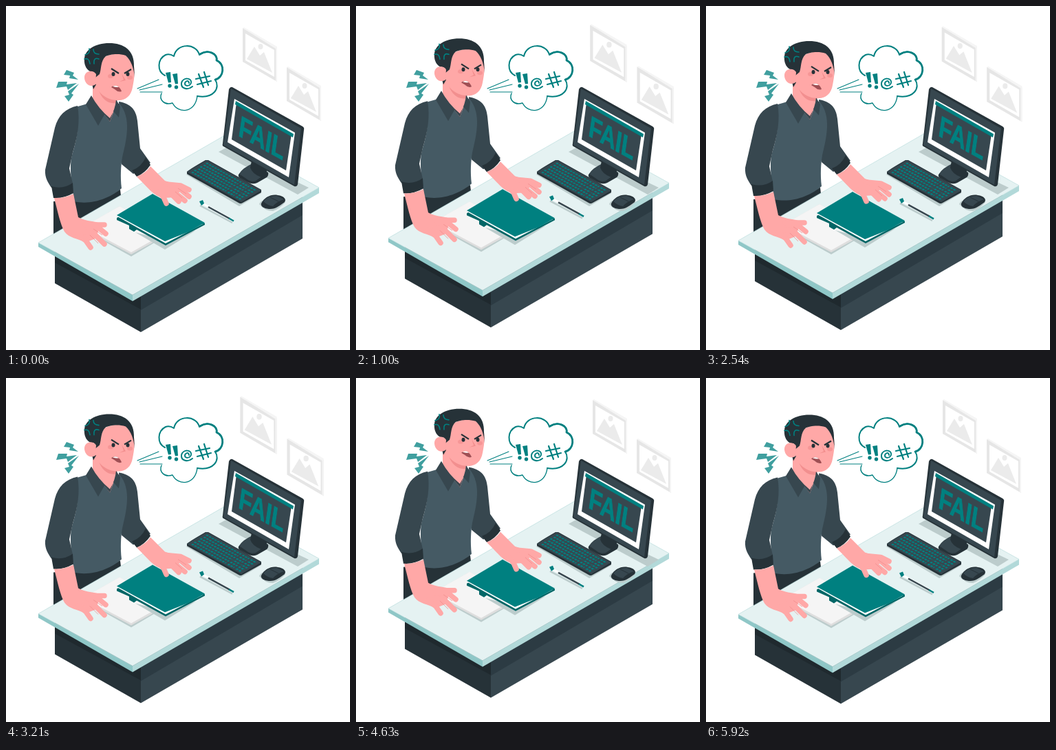
An HTML page that plays this animation: 500 by 500 pixels, repeating every 5.96 s.

```html
<!DOCTYPE html>
<html lang="en">
<head>
<meta charset="utf-8">
<title>Angry at the desk</title>
<style>
html, body { margin: 0; width: 100%; height: 100%; overflow: hidden; background: #fff; }
svg { display: block; width: 100vw; height: 100vh; }
.teal { fill: #008080; }
.ink { fill: #263238; }
.slate { fill: #37474f; }
.vest { fill: #455a64; }
.skin { fill: #ffa8a7; }
.blush { fill: #f28f8f; }
.finger { fill: none; stroke: #ffa8a7; stroke-width: 7.5; stroke-linecap: round; stroke-linejoin: round; }
.line { fill: none; stroke: #008080; stroke-linecap: round; stroke-linejoin: round; }
.shade { fill: #bccccc; }
text { font: bold 42px "Liberation Sans", Arial, sans-serif; }
</style>
</head>
<body>
<svg viewBox="0 0 500 500">
  <defs>
    <g id="picture">
      <path fill="#e6e6e6" d="M344 32l50 29v49l-50-29z"/>
      <path fill="#f5f5f5" d="M344 32l2-1 48 28v51l-2-1V62z"/>
      <path fill="#fff" d="M348 40l42 24v39l-42-24z"/>
      <path fill="#ebebeb" d="M350 77l11-18 8 13 6-5 12 30z"/>
      <ellipse fill="#ebebeb" cx="370" cy="59" rx="3.5" ry="4"/>
    </g>
  </defs>

  <g id="pictures">
    <use href="#picture"/>
    <use href="#picture" x="64" y="57"/>
  </g>

  <!-- speech cloud -->
  <path class="line" stroke-width="2" d="M231 101C219 95 220 77 232 71Q238 69 244 73C248 53 277 54 281 71C293 62 309 69 306 79C319 84 317 104 304 107C312 119 302 135 278 131"/>
  <path class="line" stroke-width="1.4" d="M226 127C222 136 230 145 242 141C250 157 275 156 278 131"/>
  <path class="line" stroke-width="2.800" d="M282 70C294 62 308 70 306 79C319 84 317 104 304 107"/>
  <path class="teal" d="M232 97l7-1 1 15-4 .5zM242 99l7-1 1 15-4 .5z"/>
  <circle class="teal" cx="238" cy="116" r="2.700"/>
  <circle class="teal" cx="247.500" cy="118" r="2.700"/>
  <path class="line" stroke-width="2" d="M266 112C266 107 260 109 260 113C260 117 267 117 269 112C271 104 257 103 255 112C254 120 264 123 271 117"/>
  <path class="line" stroke-width="2.200" d="M280 99l7 19M288 96l6 19M276 106l20-4M278 114l20-5"/>
  <path class="line" stroke-width="1.100" d="M191 120L222 107M194 122L227 114M195 125L227 125"/>

  <!-- anger bolts -->
  <path fill="#409f9f" d="M88 93l11 4-2 4 8 6-13-2 1-4-9-1zM76 110l13 0-1 4 15-2-13 10-2-5-15 2zM106 113l-11 14 3 2-7 10-6-8 7-2-2-5z"/>

  <g id="scene">
    <path class="ink" d="M69 284L99 280L166 267L170 300L75 340H69z"/>

    <!-- torso and sleeves -->
    <path class="slate" d="M164 139C181 142 189 150 191 167L195 207L210 228L185 244L168 230z"/>
    <path class="vest" d="M122 141L101 147C107 168 104 190 97 213C90 235 97 262 99 284C124 290 152 279 168 265C166 248 167 232 169 220C175 195 183 163 165 142z"/>
    <path class="slate" d="M104 145C86 149 76 159 71 177L57 238C56 250 62 258 66 264Q82 268 97 258L92 236L97 213C104 190 108 168 104 145z"/>
    <path class="ink" d="M66 262Q83 267 97 257L98 272Q84 280 69 279zM203 220L210 231Q202 243 190 248L183 239Q197 234 203 220z"/>
    <path class="skin" d="M126 105V136L151 168L161 141V120z"/>
    <path class="blush" d="M134 119Q145 134 162 137L160 141C146 143 137 132 134 119z"/>
    <path class="slate" d="M124 130L116 143L134 174L143 158L151 168V163Q134 149 124 130zM160 136L166 146L164 162L156 153L151 168V163Q159 150 160 136z"/>

    <!-- head -->
    <path class="skin" d="M131 88C140 66 175 64 184 79C188 92 187 104 184 118C182 131 173 138 162 137C146 137 133 126 129 112z"/>
    <path class="ink" d="M128 96C117 96 113 85 114 76C115 64 129 54 150 54C171 54 187 64 186 88L187 104Q185 82 174 72C162 68 150 71 145 73C137 80 139 91 136 99L130 104z"/>
    <path class="ink" d="M124 110L131 114L127 121z"/>
    <path class="skin" d="M131 99C125 91 113 95 114 105C115 114 123 119 130 114z"/>
    <path class="line" stroke-width="1.600" d="M121 62Q123 69 115 71M127 63Q127 70 135 70M114 77Q121 75 122 84M135 77Q127 74 128 84"/>
    <ellipse class="blush" cx="152" cy="102" rx="4" ry="3" opacity=".7"/>
    <ellipse class="blush" cx="180" cy="104" rx="4" ry="3" opacity=".7"/>
    <path class="blush" d="M168 98L174 108L165 110L171 107z"/>
    <ellipse class="ink" cx="156" cy="99" rx="2.500" ry="3"/>
    <ellipse class="ink" cx="177" cy="99" rx="2.500" ry="3"/>
    <path d="M153 91L164 98M172 98L182 92" stroke="#263238" stroke-width="2.200" fill="none"/>
    <path fill="#9f4f54" d="M153 118C158 113 166 117 168 124Q163 126 158 121z"/>
    <path fill="#fff" d="M155 117Q160 114 164 118L160 118z"/>

    <!-- desk -->
    <path class="ink" d="M71 355L196 412V474L71 403z"/>
    <path class="slate" d="M196 412L431 275V338L196 474z"/>
    <path fill="#2c3b43" d="M196 412L431 275V304L196 442z"/>
    <path fill="#1f292e" d="M71 360L196 420V441L71 373z"/>
    <path fill="#8fc7c7" d="M47 344L184 420V429L47 350z"/>
    <path fill="#b2d9d9" d="M184 420L455 264V272L184 429z"/>
    <path fill="#e5f2f2" stroke="#b2d9d9" stroke-width=".6" d="M47 344L318 188L455 264L184 420z"/>

    <!-- papers and folder -->
    <path class="shade" d="M112 325L165 294L236 332L182 364z"/>
    <path fill="#dedede" d="M112 321L165 291L235 328V332L182 361L112 324z"/>
    <path fill="#f5f5f5" d="M112 321L165 291L235 328L182 358z"/>
    <path class="shade" d="M188 329L231 354L276 326L230 340z"/>
    <path fill="#006666" d="M161 308L214 276L289 316V318L232 348L190 325L186 328L179 324V319L161 311z"/>
    <path fill="#fff" d="M162 306L214 278L286 317L232 345z"/>
    <path class="teal" d="M161 304L213 273L289 315L266 328L231 342z"/>

    <!-- pen -->
    <path d="M282 290L329 315" stroke="#bccccc" stroke-width="2.500"/>
    <path d="M284 286L329 311" stroke="#fff" stroke-width="3"/>
    <path d="M294 292L325 309" stroke="#37474f" stroke-width="2.500"/>
    <path d="M324 308.500L331 312.500" stroke="#008080" stroke-width="2.500"/>
    <path class="teal" d="M281 284l5-2 2 5-4 3z"/>

    <!-- forearms and hands -->
    <path class="skin" d="M70 279Q84 280 98 273L105 307C117 314 132 312 138 317L130 338L115 344C104 337 92 338 85 328C79 318 75 298 70 279z"/>
    <path class="finger" d="M115 318L143 318M119 322L134 322L145 331M115 329L128 331L143 346M105 332L116 341L123 351"/>
    <path class="skin" d="M190 248Q203 243 210 233L231 254L255 262L249 278L228 279C214 275 209 267 190 248z"/>
    <path class="finger" d="M233 259L254 261L266 267M239 265L254 267L266 277M238 271L250 275L260 283M240 273L251 284M222 270L229 278L233 287"/>
    <path fill="none" stroke="#f28f8f" stroke-width=".8" d="M127 324L140 333M122 333L134 345M250 265L262 273M246 270L256 279"/>
  </g>

  <!-- computer -->
  <path class="shade" d="M309 212L320 206L440 264L424 274z"/>
  <path class="ink" d="M338 245Q345 234 358 230L381 242Q382 246 379 249L365 257Q358 260 351 256L340 250Q337 248 338 245z"/>
  <path class="slate" d="M339 244Q347 234 358 229L380 242L363 254Q357 256 352 253z"/>
  <path class="ink" d="M358 220L379 232V245L371 249Q358 244 355 235z"/>
  <path class="ink" d="M324 121Q326 117 329 118L431 175Q434 177 433 180L424 259Q423 263 419 262L316 204Q314 203 315 200z"/>
  <path class="slate" d="M327 120L429 178L419 260L316 202z"/>
  <path fill="#fff" d="M332 135L420 184L411 249L322 198z"/>
  <path class="slate" d="M335 140L415 186L407 239L328 194z"/>
  <path class="teal" d="M334 138L418 186L417 191L333 143z"/>
  <text class="teal" stroke="#008080" stroke-width="1" transform="matrix(.72 .4 -.145 .99 337 188)">FAIL</text>

  <!-- keyboard -->
  <path class="shade" d="M262 245L292 229L371 272L339 291z"/>
  <path class="ink" d="M263 241Q264 239 290 224L294 224L371 267V271L344 286Q341 288 338 286L263 244z"/>
  <g transform="matrix(.79 .44 -.29 .17 292 224)">
    <path class="slate" d="M0 0H100V100H0z"/>
    <path stroke="#008080" stroke-width="8" stroke-dasharray="3.500 1.600" fill="none" d="M4 14H96M5 29H96M4 44H96M6 59H96M4 74H96M5 89H96"/>
    <path stroke="#37474f" stroke-width="2" d="M69 5V95M84 5V95"/>
  </g>

  <!-- mouse -->
  <path class="shade" d="M368 288Q370 281 382 282L406 285Q399 294 388 298Q376 298 368 288z"/>
  <path class="ink" d="M371 287C375 278 386 273 395 275C404 276 408 281 405 285C398 290 391 296 382 295C374 294 370 291 371 287z"/>
  <path class="slate" d="M374 284Q381 275 394 276L404 281Q394 284 388 291Q380 290 374 284z"/>
  <path d="M384 278L396 284" stroke="#263238" stroke-width="1"/>
</svg>
<script>
const LOOP = 5960;
const scene = document.getElementById('scene');
const pictures = document.getElementById('pictures');

// Heartbeat: [ms, scale], linear between keys
const beat = [[0, 1], [600, 1.1], [1800, 1], [2400, 1], [3000, 1.1], [3600, 1], [6000, 1]];

function scaleAt(t) {
  const i = beat.findIndex(key => key[0] > t);
  const [t0, s0] = beat[i - 1], [t1, s1] = beat[i];
  return s0 + (s1 - s0) * (t - t0) / (t1 - t0);
}

function draw(now) {
  const t = now % LOOP;
  const lift = 10 * (1 - Math.abs(t % 3000 / 1500 - 1));
  scene.setAttribute('transform', `translate(0 ${-lift})`);
  pictures.setAttribute('transform', `translate(401 99.5) scale(${scaleAt(t)}) translate(-401 -99.5)`);
}

const start = performance.now();
function tick() {
  draw(performance.now() - start);
  requestAnimationFrame(tick);
}
tick();
</script>
</body>
</html>
```
